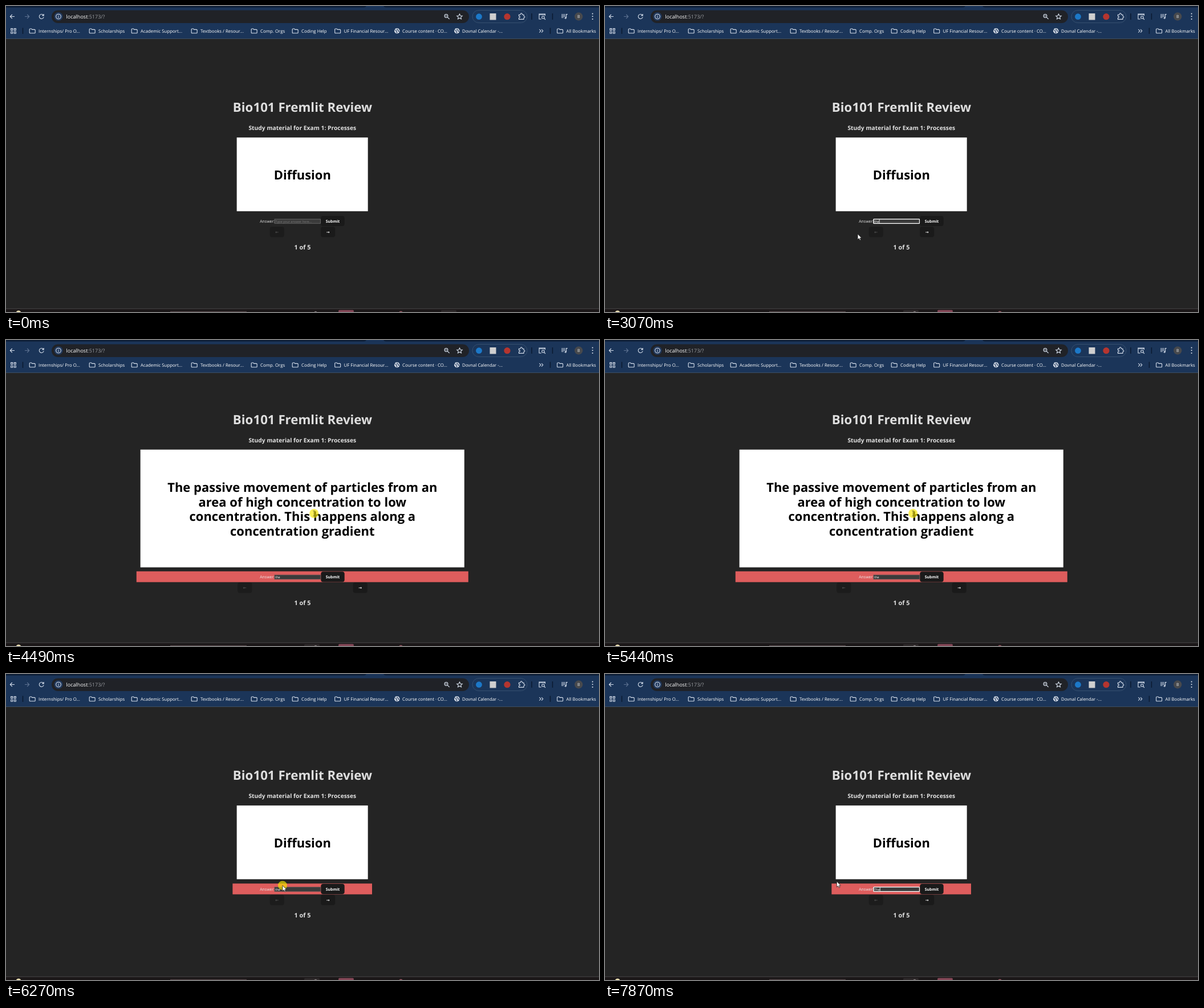
Write an HTML page that moves like this. It is 1040 px wide and 538 px high and loops after 8000 ms.

```html
<!DOCTYPE html>
<html lang="en">
<head>
<meta charset="utf-8">
<title>Flash card review</title>
<style>
  html, body { margin: 0; width: 100%; height: 100%; overflow: hidden; background: #242424; }
  svg { display: block; width: 1040px; height: 538px; }
  text { font-family: "Open Sans", "Noto Sans", sans-serif; text-rendering: geometricPrecision; white-space: pre; }
  .bold { font-weight: 700; }
  .mid { text-anchor: middle; }
  .mark { font-size: 7.85px; fill: #fff; }
  .line { fill: none; stroke: #d5deeb; stroke-width: 1.1; }
  .arrow { font-family: "DejaVu Sans", sans-serif; font-size: 7px; font-weight: 700; text-anchor: middle; }
</style>
</head>
<body>
<svg viewBox="0 0 1040 538">
  <defs>
    <path id="folder" class="line" d="M.6 1.8Q.6.6 1.8.6H4L5.2 2H9.6Q10.6 2 10.6 3V7.4Q10.6 8.4 9.6 8.4H1.8Q.6 8.4.6 7.4Z"/>
    <g id="globe">
      <circle cx="5" cy="5" r="4.7" fill="#dfe5ee"/>
      <path d="M1 3.2L4 4.2L3.4 6.4L5.2 7.4L4.6 9M5.4.8L5 2.6L7.4 3.6L6.8 5.4L9 6.2" fill="none" stroke="#1b3459" stroke-width="1.1"/>
    </g>
  </defs>

  <rect width="1040" height="538" fill="#242424"/>

  <!-- browser bars -->
  <rect width="1040" height="58" fill="#1b3559"/>
  <rect width="1040" height="2.6" fill="#0d1d35"/>
  <path d="M626 2.8Q631 2.4 632 0H662Q663 2.4 668 2.8Z" fill="#1b3559"/>
  <rect y="57" width="1040" height="1" fill="#3d4d62"/>
  <rect x="80" y="7.5" width="732" height="22.5" rx="11.2" fill="#202227"/>
  <g class="line">
    <path d="M15 18.5H7.4M10.8 15L7.3 18.5L10.8 22"/>
    <path d="M33 18.5H40.6M37.2 15L40.7 18.5L37.2 22" stroke="#5d7291"/>
    <path d="M65.6 16.2A4 4 0 1 0 66.2 19.4M66.2 14V16.9H63.2"/>
    <circle cx="92" cy="18.5" r="7.6" fill="#223a5e" stroke="none"/>
    <circle cx="92" cy="18.5" r="4.3"/>
    <path d="M92 17.9V20.8M92 16V17"/>
    <circle cx="772" cy="17.5" r="2.9"/>
    <path d="M774.2 19.7L777.6 23M770.6 17.5H773.4"/>
    <path d="M795.5 14L796.9 17.1L800.2 17.4L797.7 19.6L798.5 22.9L795.5 21.2L792.5 22.9L793.3 19.6L790.8 17.4L794.1 17.1Z"/>
    <rect x="818" y="7.5" width="96" height="22" rx="11" stroke="#36506f" stroke-width="1"/>
    <path d="M899.5 15.2H902.2Q902 12.9 903.8 12.9Q905.6 12.9 905.4 15.2H908V17.8Q909.9 17.8 909.9 19.2Q909.9 20.7 908 20.7V23.4H899.5V20.8Q901.5 20.7 901.5 19.3Q901.5 17.9 899.5 17.9Z"/>
    <path d="M939 23H935V14H945.5V17M935 15.2H945.5"/>
    <circle cx="942" cy="20" r="2.2"/><path d="M943.7 21.7L946 24"/>
    <path d="M974 15H981M974 17.6H981M974 20.2H978M982.6 21V14.6H984.8"/>
    <circle cx="981.3" cy="21" r="1.1"/>
    <path d="M8.7 39.6H11.7V42.6H8.7ZM14.3 39.6H17.3V42.6H14.3ZM8.7 45.2H11.7V48.2H8.7ZM14.3 45.2H17.3V48.2H14.3Z"/>
    <path d="M935.4 41L938 43.8L935.4 46.6M939.2 41L941.8 43.8L939.2 46.6"/>
  </g>
  <circle cx="829.5" cy="18.7" r="5.4" fill="#1c78c8"/>
  <rect x="848.5" y="13" width="11" height="11.5" fill="#cfcfcf"/>
  <circle cx="879" cy="18.7" r="5.6" fill="#b5352f"/>
  <path d="M922 13V24M958.5 13V24M29.5 38.5V49M954.5 38.5V49" stroke="#0b1a30" stroke-width="1.5"/>
  <circle cx="1004.3" cy="18.5" r="7.2" fill="#47494d"/>
  <text x="1004.3" y="21.2" class="mid" font-size="7.2" fill="#e6e6e6">B</text>
  <path d="M1028.7 13.6h.01M1028.7 18.3h.01M1028.7 23h.01" stroke="#dde4ee" stroke-width="2.1" stroke-linecap="round"/>
  <text x="105.6" y="22" font-size="9" fill="#fff">localhost<tspan fill="#9a9da2">:5173/?</tspan></text>
  <g id="marks"></g>

  <!-- taskbar edge -->
  <rect y="532" width="1040" height="6" fill="#1b1718"/>
  <rect y="531.8" width="1040" height="1" fill="#474545"/>
  <rect x="288" y="536.8" width="134" height="1.2" fill="#55484a"/>
  <rect id="task1" x="523" y="534.8" width="27" height="4" rx="1.5" fill="#2e292a"/>
  <rect id="task2" x="763" y="534.8" width="27" height="4" rx="1.5" fill="#2e292a"/>
  <rect x="583" y="534.6" width="27" height="4" rx="2" fill="#854858"/>
  <circle cx="22" cy="540" r="4.6" fill="#efe3b5"/>
  <circle cx="543" cy="539.4" r="2.6" fill="#8d8587"/>
  <circle cx="692.5" cy="540" r="3.4" fill="#9b5a66"/>

  <!-- page -->
  <g id="head">
    <text x="520" y="186.3" class="bold mid" font-size="22.3" fill="#dedede">Bio101 Fremlit Review</text>
    <text x="519.8" y="218.2" class="bold mid" font-size="10.3" fill="#e2e2e2">Study material for Exam 1: Processes</text>
  </g>
  <rect id="card" fill="#fff"/>
  <g id="cardText" class="bold mid" font-size="22"></g>
  <g id="foot">
    <rect id="form" y="368.4" height="19" fill="#de5d5d"/>
    <text x="445.2" y="381" font-size="6.95" fill="#ececec">Answer:</text>
    <rect id="input" x="471" y="374.8" width="80.5" height="7.4" fill="#3b3b3b" stroke-width=".8"/>
    <rect id="pick" y="375.4" height="6.2" fill="#3f74c4"/>
    <text id="value" x="472.2" y="380.5" font-size="5.6"></text>
    <rect id="caret" y="375.4" width=".8" height="6.2" fill="#fff"/>
    <rect id="ring" x="471" y="374.6" width="80.6" height="7.8" rx="1" fill="none" stroke="#fff" stroke-width="1.4"/>
    <rect id="submit" x="552.3" y="368.9" width="41.4" height="18.2" rx="4" fill="#1a1a1a" stroke-width=".7"/>
    <text x="573" y="381" class="bold mid" font-size="6.88" fill="#fff">Submit</text>
    <g id="prev">
      <rect x="462.8" y="388" width="25" height="18.4" rx="4" fill="#1c1c1c"/>
      <text x="475.2" y="400.2" class="arrow" fill="#555">←</text>
    </g>
    <g id="next">
      <rect x="552.2" y="388" width="25" height="18.4" rx="4" fill="#1a1a1a"/>
      <text x="564.7" y="400.2" class="arrow" fill="#fff">→</text>
    </g>
    <text x="520" y="427.8" class="bold mid" font-size="10.8" fill="#e2e2e2">1 of 5</text>
  </g>

  <!-- pointer -->
  <g id="pointer">
    <circle id="press" r="8" fill="#f7e600" opacity=".66"/>
    <path id="a" d="M0 0V10L2.3 7.9L3.9 11.2L5.5 10.5L4 7.3H7Z" fill="#fff" stroke="#111" stroke-width=".7"/>
    <path id="i" d="M-2 -4.6H-.4L0 -4.2L.4 -4.6H2M0 -4.2V4.2M-2 4.6H-.4L0 4.2L.4 4.6H2" fill="none" stroke-width=".7"/>
    <path id="h" d="M-1 .6Q0 -.6 1 .6V4L5 5V8L4 11H-1.6L-4 7L-3 6.2L-1 7.6Z" fill="#fff" stroke="#111" stroke-width=".7"/>
  </g>
</svg>
<script>
const LOOP = 8000;
const $ = id => document.getElementById(id);
const set = (id, attrs) => { for (const k in attrs) $(id).setAttribute(k, attrs[k]); };
const show = (id, on) => set(id, { visibility: on ? "visible" : "hidden" });
const within = (t, spans) => spans.some(([a, b]) => t >= a && t < b);

const marks = [
  [57, "Internships/ Pro O..."], [162, "Scholarships"], [236, "Academic Support..."],
  [341, "Textbooks / Resour..."], [446, "Comp. Orgs"], [518, "Coding Help"],
  [592.5, "UF Financial Resour..."], [695, "Course content · CO...", 1],
  [800, "Dovnal Calendar -...", 1], [982.5, "All Bookmarks"]
];
$("marks").innerHTML = marks.map(([x, label, web]) =>
  `<use href="#${web ? "globe" : "folder"}" x="${x - (web ? 14.2 : 16.4)}" y="${web ? 38.8 : 39.4}"/>` +
  `<text class="mark" x="${x}" y="46.6">${label}</text>`).join("");

const layouts = {
  small: { shift: 0, card: [404.7, 231.2, 230, 129.6], form: [397.4, 244.6], nav: 0, first: 304.9, lines: ["Diffusion"] },
  big: {
    shift: 38.3, card: [235.7, 192.7, 568.1, 207], form: [228.8, 582], nav: 56.5, first: 266.8,
    lines: ["The passive movement of particles from an", "area of high concentration to low",
      "concentration. This happens along a", "concentration gradient"]
  }
};

// time, x, y and, where it changes, the cursor: a = arrow, i = beam, h = hand
const track = [
  [190, 792, 536, "a"], [330, 700, 475], [480, 590, 415], [620, 490, 362], [720, 438, 347],
  [830, 455, 361], [940, 483, 373], [1010, 485.5, 377, "i"], [1080, 486, 378], [2990, 486, 378],
  [3070, 443, 400.6, "a"], [3200, 460, 416], [3350, 520, 409], [3480, 565, 383, "h"], [3610, 574, 370],
  [4090, 574, 370], [4150, 569, 357, "a"], [4290, 545, 317, "i"], [4350, 540.2, 305],
  [5570, 540.2, 305], [5700, 525, 325, "a"], [5900, 500, 351], [6100, 487, 368], [6200, 485, 371.6],
  [6270, 485, 371.6], [6340, 484, 378, "i"], [6480, 478, 379], [6700, 445, 374], [6900, 401, 368],
  [7070, 405, 365], [7140, 406.4, 364.6, "a"], [LOOP, 406.4, 364.6]
];
const presses = [[1680, 1810], [3610, 3890], [4420, 4560], [5440, 5570], [6270, 7070]];
const hint = "Type your answer here...";
const typing = [[0, hint], [2270, "t"], [2540, "th"], [2610, "the"], [7610, "T"], [7800, "Th"], [7870, "The"]];

function pointerAt(t) {
  let kind = "a", k = 0;
  for (let n = 0; n < track.length && track[n][0] <= t; n++) {
    k = n;
    kind = track[n][3] || kind;
  }
  const p = track[k], q = track[k + 1] || p;
  const f = Math.max(0, (t - p[0]) / (q[0] - p[0] || 1));
  return { x: p[1] + (q[1] - p[1]) * f, y: p[2] + (q[2] - p[2]) * f, kind };
}

let current;
function arrange(name) {
  if (name === current) return;
  current = name;
  const { shift, card: [x, y, width, height], form, nav, first, lines } = layouts[name];
  set("head", { transform: `translate(0 ${-shift})` });
  set("foot", { transform: `translate(0 ${shift})` });
  set("card", { x, y, width, height });
  set("form", { x: form[0], width: form[1] });
  set("prev", { transform: `translate(${-nav} 0)` });
  set("next", { transform: `translate(${nav} 0)` });
  $("cardText").innerHTML = lines.map((s, n) => `<text x="519.8" y="${first + n * 25.7}">${s}</text>`).join("");
}

function render(t) {
  arrange(within(t, [[4490, 5510]]) ? "big" : "small");
  const wrong = t >= 3750;
  const focus = within(t, [[1680, 3750], [6340, LOOP]]);
  const { x, y, kind } = pointerAt(t);
  const pressed = within(t, presses);

  const text = typing.filter(s => s[0] <= t).pop()[1];
  if ($("value").textContent !== text) $("value").textContent = text;
  set("value", { fill: text === hint ? "#757575" : "#fff" });
  const end = 472.2 + (text === hint ? 0 : $("value").getComputedTextLength());
  const from = Math.max(472.2, Math.min(end, x));
  const picked = within(t, [[6480, 7610]]);
  set("pick", { x: from, width: picked ? end - from : 0 });
  set("caret", { x: end });
  show("caret", within(t, [[1680, 3110], [3610, 3750], [6340, 6480], [7610, LOOP]]));

  show("form", wrong);
  show("ring", focus);
  set("input", { stroke: within(t, [[1010, 2270]]) ? "#8f8f8f" : wrong ? "#555" : "#707070" });
  const hover = Math.max(0, Math.min(1, (t - 3480) / 250, (4300 - t) / 150));
  set("submit", { stroke: "#646cff", "stroke-opacity": hover });

  show("task1", t >= 1680);
  show("task2", t < 1810);

  const seen = within(t, [[190, 2270], [3070, LOOP]]);
  set("pointer", { transform: `translate(${x} ${y})` });
  for (const id of ["a", "i", "h"]) show(id, seen && kind === id);
  show("press", seen && pressed);
  set("i", { stroke: y > 365 && !pressed ? "#eee" : "#55521f" });
}

const start = performance.now();
function tick() {
  render((performance.now() - start) % LOOP);
  requestAnimationFrame(tick);
}
tick();
</script>
</body>
</html>
```
